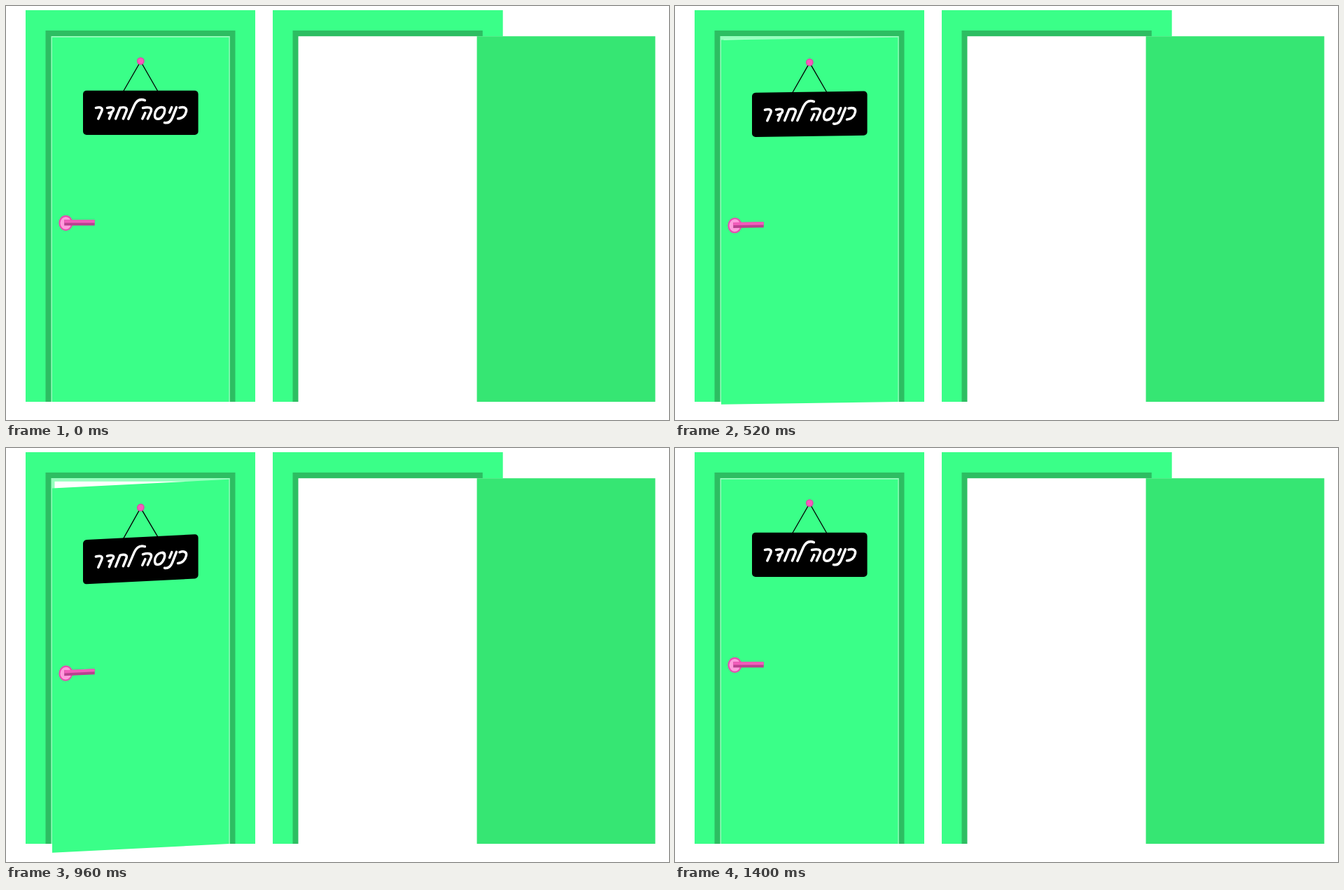
Write an HTML page that moves like this. It is 947 px wide and 591 px high and loops after 1.44 s.

```html
<!DOCTYPE html>
<html lang="he">
<head>
<meta charset="utf-8">
<title>כניסה לחדר</title>
<style>
  html, body { margin: 0; width: 100%; height: 100%; overflow: hidden; background: #fff; }
  svg { display: block; width: 947px; height: 591px; }
  .wall { fill: #3aff88; }
  .trim { fill: #2dbe62; }
  .edge { fill: #96ffbe; }
  .open { fill: #fff; }
  .string { fill: none; stroke: #000; stroke-width: 1.3; }
  .letters { fill: none; stroke: #fff; stroke-width: 3.5; stroke-linecap: round; stroke-linejoin: round; }
</style>
</head>
<body>
<svg viewBox="0 0 947 591">
  <!-- closed doorway -->
  <rect class="wall" x="28" y="6" width="328" height="559"/>
  <rect class="trim" x="56.5" y="35" width="271" height="530"/>
  <rect class="edge" x="64.5" y="43" width="255.3" height="522"/>
  <rect class="open" x="69.5" y="47.8" width="245" height="517.2"/>

  <g id="door">
    <rect class="wall" x="66" y="44.8" width="252.4" height="520.2"/>
    <path class="string" d="M167.5 122 L192.3 79 L217 122"/>
    <circle cx="192.3" cy="78.6" r="4.7" fill="#f65cbc" stroke="#dc4aa8" stroke-width="1.4"/>
    <rect x="110" y="120.8" width="164.6" height="63.2" rx="5"/>
    <g class="letters" role="img" aria-label="כניסה לחדר">
      <path d="M248 145.2 C254 143.2 258.5 145.5 257.4 150.5 C256 157 251.5 160.8 245.5 160.8"/>
      <path d="M243.5 144.5 L237.5 159.5 C235 165.5 231 167.6 226.5 166.6"/>
      <path d="M236.8 144.5 L233.6 152.2"/>
      <path d="M222.5 144.5 C216 144.5 212.5 151 212.5 156 C212.5 163 220 162.5 223.5 157.5 C227.5 152 228.5 144.5 222.5 144.5 Z"/>
      <path d="M195.5 145.5 C204 143.6 209 145 207.2 150.5 L202.3 161 M198.8 152.6 L194.8 161"/>
      <path d="M174.8 161.2 L183.2 142 C186.5 135 191 131.8 198.4 134.6"/>
      <path d="M156.6 161 L163 145.2 C170 143.6 173.8 145.4 171.8 150.4 L167.4 161"/>
      <path d="M144.5 145.4 C151 143.8 155.2 145 153.2 149 C152 151.6 149.6 152.4 146.8 152.8 M151 152.4 L147.4 161"/>
      <path d="M128.4 145.4 C135.5 143.8 138.6 145.6 136.6 150.2 L131.8 161"/>
    </g>
    <ellipse cx="85.4" cy="309.8" rx="9" ry="10" fill="#ff9bdd" stroke="#e54fb0" stroke-width="2.2"/>
    <rect x="83.2" y="305.4" width="43.5" height="8" fill="#b8428f"/>
    <rect x="83.2" y="305.4" width="43.5" height="4.2" fill="#f25cbb"/>
  </g>

  <!-- open doorway -->
  <rect class="wall" x="381" y="6" width="328.7" height="559"/>
  <rect class="trim" x="409.5" y="35" width="271.3" height="530"/>
  <rect class="open" x="417.5" y="43.2" width="293" height="522"/>
  <rect x="672.6" y="43.2" width="254.8" height="521.8" fill="#36e673"/>
</svg>
<script>
const LOOP = 1440, STEP = 40, PEAK = 1200, BACK = 200;
const MAX_DROP = 20, HINGE = 319, WIDTH = 253;
const door = document.getElementById("door");

// Drop of the free edge: quadratic opening, then a quick swing shut.
function drop(t) {
  if (t < PEAK) return MAX_DROP * (t / PEAK) ** 2;
  const u = Math.min(1, (t - PEAK) / BACK);
  return MAX_DROP * (1 - u ** 1.18);
}

function draw(now) {
  let t = Math.floor((now % LOOP) / STEP) * STEP;
  if (t < 2 * STEP) t = 0;
  const slope = drop(t) / WIDTH;
  door.setAttribute("transform", `matrix(1 ${-slope} 0 1 0 ${slope * HINGE})`);
}

const start = performance.now();
function tick() {
  draw(performance.now() - start);
  requestAnimationFrame(tick);
}
tick();
</script>
</body>
</html>
```
